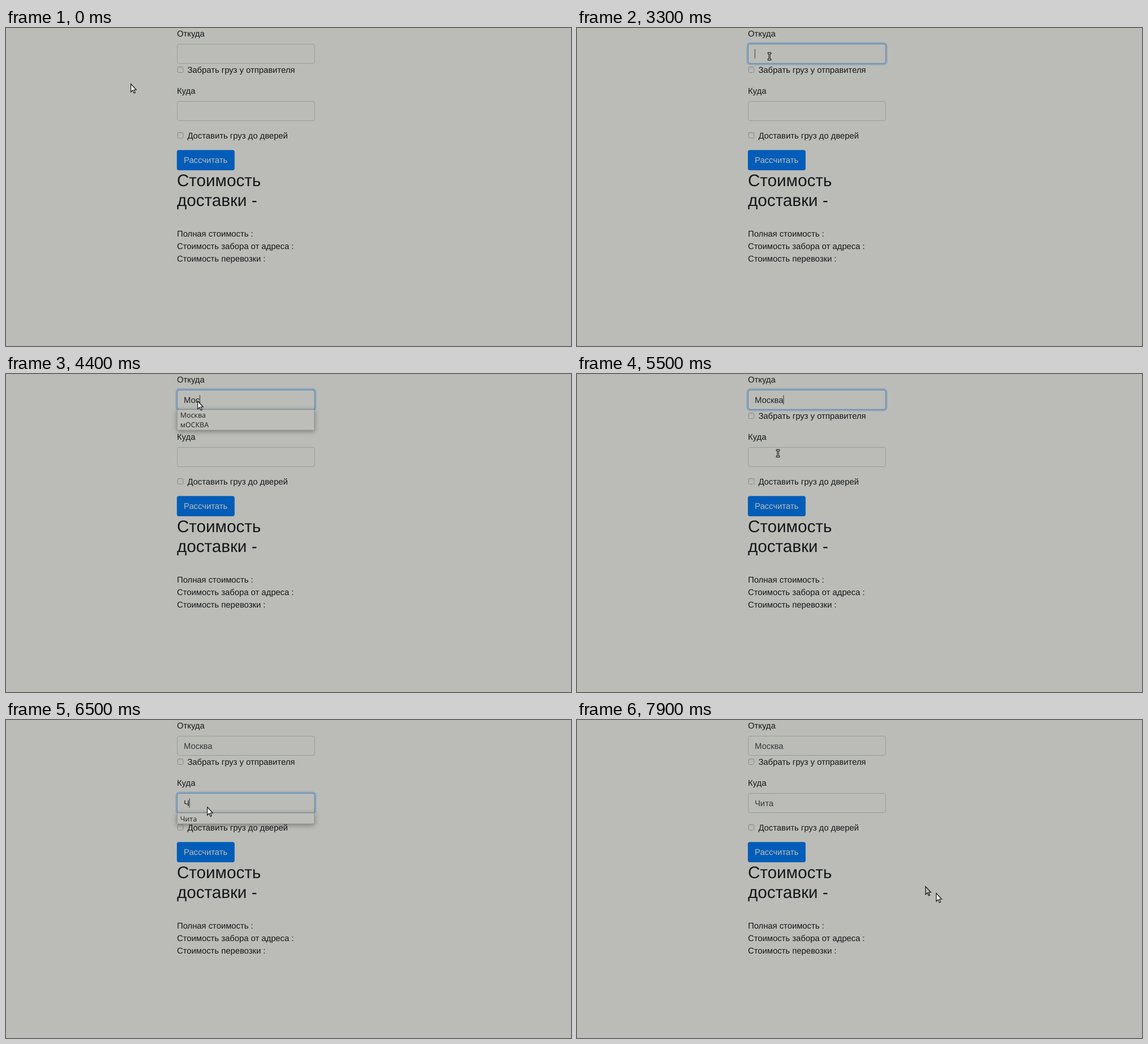
Recreate the animation shown at these times as an HTML page. Size 998 px wide and 561 px high, loop 8 s.

```html
<!DOCTYPE html>
<html lang="ru">
<head>
<meta charset="utf-8">
<style>
html, body { margin: 0; width: 100%; height: 100%; overflow: hidden; background: #bbbcb7; }
svg { display: block; width: 998px; height: 561px; }
text { font: 14.8px "Liberation Sans", Arial, sans-serif; fill: #15181a; white-space: pre; text-rendering: geometricPrecision; }
.title { font-size: 29.6px; }
.value { fill: #363b3e; }
.value.active { fill: #202427; }
.option { font: 12.4px "Noto Sans", "Open Sans", sans-serif; fill: #2b2c2b; }
.box { fill: #bbbcb7; stroke: #979c9c; stroke-width: .95; }
.ring { fill: none; stroke: #8ca4b8; stroke-width: 3; }
.edge { fill: none; stroke: #5e8bb7; stroke-width: 1; }
.check { fill: url(#shade); stroke: #8a8b88; stroke-width: 1; }
.list rect { fill: #bdbeb9; stroke: #999a96; stroke-width: .9; filter: drop-shadow(0 2px 4px rgba(0, 0, 0, .36)); }
</style>
</head>
<body>
<svg viewBox="0 0 998 561">
  <defs>
    <linearGradient id="shade" x2="0" y2="1">
      <stop stop-color="#b3b4b0"/><stop offset="1" stop-color="#c0c1bc"/>
    </linearGradient>
    <path id="arrow" d="M.6 .8V14.8L3.8 11.8L6.2 17L8.3 16L6 11H10.2Z" stroke="#111" stroke-width="1.15"/>
    <g id="beam" fill="none">
      <path d="M-3.3-5.6H3.3M-3.3 5.6H3.3M0-5.6V5.6" stroke="#111" stroke-width="3.2"/>
      <path d="M-2.6-5.6H2.6M-2.6 5.6H2.6M0-5.6V5.6" stroke="#ddd" stroke-width="1"/>
    </g>
  </defs>

  <text x="302" y="14.7">Откуда</text>
  <g id="from"></g>
  <rect class="check" x="303" y="68.7" width="9.8" height="9.8" rx="2"/>
  <text x="320.4" y="79">Забрать груз у отправителя</text>
  <text x="302" y="116">Куда</text>
  <g id="to"></g>
  <rect class="check" x="303" y="184.4" width="9.8" height="9.8" rx="2"/>
  <text x="320.4" y="195.3">Доставить груз до дверей</text>
  <rect x="301.8" y="215.2" width="102" height="35.7" rx="3.6" fill="#025db8"/>
  <text x="314" y="238.4" style="fill:#bbbcb7">Рассчитать</text>
  <text class="title" x="302" y="278.6">Стоимость</text>
  <text class="title" x="302" y="314">доставки -</text>
  <text x="302" y="368">Полная стоимость :</text>
  <text x="302" y="390">Стоимость забора от адреса :</text>
  <text x="302" y="412">Стоимость перевозки :</text>
  <g id="lists"></g>
  <use id="ghost" href="#arrow" fill="#bbbcb7"/>
  <use id="pointer" fill="#fff"/>
</svg>
<script>
const $ = id => document.getElementById(id);
const LOOP = 8000;

// Each track is a list of [start time, value...]; the latest started row applies.
const at = (track, t) => track.findLast(row => row[0] <= t);

const pointerTrack = [
  [0, "arrow", 220, 98], [400, "arrow", 236, 92], [500, "arrow", 275, 74],
  [600, "arrow", 312, 56], [700, "arrow", 329, 48.5], [900, "beam", 340, 50],
  [3500, "arrow", 338, 47], [5200, "arrow", 340, 54], [5300, "arrow", 345, 75],
  [5400, "arrow", 350, 105], [5500, "beam", 355, 140], [5600, "beam", 357, 160],
  [5700, "beam", 356, 158], [5800, "beam", 356, 156], [6500, "arrow", 355, 153],
  [7500, "arrow", 534, 227], [7600, "arrow", 600, 267], [7700, "arrow", 628, 297],
  [7800, "arrow", 641, 311], [7900, "arrow", 634, 305], [8000, "arrow", 615, 293]
];

const fields = [
  {
    id: "from", y: 28, word: "Москва", options: ["Москва", "мОСКВА"],
    keys: [3900, 4200, 4400, 4700, 4800, 5000],
    glow: [[0, 0], [900, .4], [1000, .85], [1100, 1], [3500, .2], [3700, .6], [3800, 1],
           [5600, .5], [5700, .1], [5800, 0]],
    caret: [[0, 0], [900, 1], [2100, 0], [3300, 1], [3500, 0], [3700, 1], [5600, 0]],
    list: [4000, 5200]
  },
  {
    id: "to", y: 129.1, word: "Чита", options: ["Чита"],
    keys: [6500, 6700, 6900, 7000],
    glow: [[0, 0], [5600, .4], [5700, .85], [5800, 1], [7700, .6], [7800, .15], [7900, 0]],
    caret: [[0, 0], [5600, 1], [7700, 0]],
    list: [6500, 7600]
  }
];

for (const f of fields) {
  const frame = (name, grow) => `<rect class="${name}" x="${302.5 - grow}" y="${f.y + .4 - grow}"
    width="${242.7 + 2 * grow}" height="${34 + 2 * grow}" rx="${3.5 + grow}"/>`;
  $(f.id).innerHTML = frame("box", 0) +
    `<g>${frame("ring", 1.6)}${frame("edge", 0)}</g>
     <text class="value" x="314" y="${f.y + 22.7}"></text>
     <rect y="${f.y + 9.2}" width="1" height="16.6" fill="#33383b"/>`;
  [, f.halo, f.text, f.bar] = $(f.id).children;

  const top = f.y + 34.9;
  f.menu = document.createElementNS("http://www.w3.org/2000/svg", "g");
  f.menu.setAttribute("class", "list");
  f.menu.innerHTML = `<rect x="302.5" y="${top}" width="242" height="${2 + 17 * f.options.length}"/>` +
    f.options.map((s, i) => `<text class="option" x="307.7" y="${top + 14.5 + 17 * i}">${s}</text>`).join("");
  $("lists").append(f.menu);
}

function drawField(f, t) {
  const glow = at(f.glow, t)[1];
  f.text.textContent = f.word.slice(0, f.keys.filter(k => k <= t).length);
  f.text.classList.toggle("active", glow > .5);
  f.halo.style.opacity = glow;
  f.bar.style.opacity = at(f.caret, t)[1];
  f.bar.setAttribute("x", 313.8 + f.text.getComputedTextLength());
  f.menu.style.display = t >= f.list[0] && t < f.list[1] ? "" : "none";
}

function place(el, [, shape, x, y]) {
  el.setAttribute("href", "#" + shape);
  el.setAttribute("transform", `translate(${x} ${y})`);
}

function draw(now) {
  const t = now % LOOP;
  fields.forEach(f => drawField(f, t));
  place($("pointer"), at(pointerTrack, t));
  // While leaving the form, a dim pointer runs one step ahead.
  place($("ghost"), at(pointerTrack, t + 100));
  $("ghost").style.display = t >= 7500 ? "" : "none";
  requestAnimationFrame(draw);
}
draw(performance.now());
</script>
</body>
</html>
```
